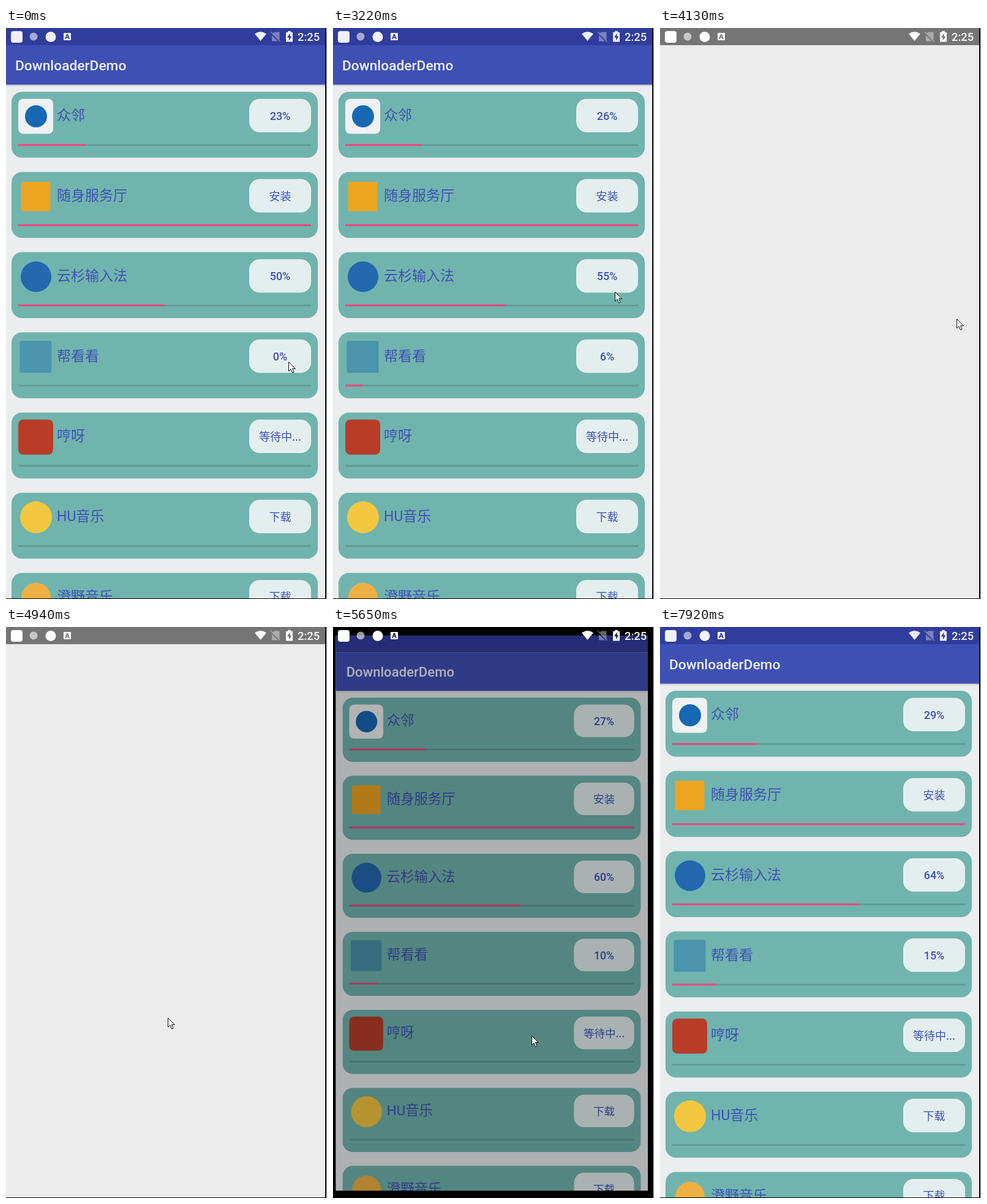
Animation of 524x931 px, one loop 8.2 s. Source, as an HTML page:

```html
<!DOCTYPE html>
<html lang="zh-CN">
<head>
<meta charset="utf-8">
<title>DownloaderDemo</title>
<style>
  html, body { margin: 0; width: 100%; height: 100%; overflow: hidden; background: #e6e6e6; }
  svg { display: block; width: 524px; height: 931px; }
  text { font-family: Roboto, "Noto Sans CJK SC", "Noto Sans CJK", sans-serif; }
  .title { font-size: 22.75px; font-weight: 500; fill: #eef0fa; }
  .name { font-size: 23px; fill: #3f51b5; }
  .action { font-size: 18px; font-weight: 500; fill: #3f51b5; text-anchor: middle; }
  .clock { font-size: 18.3px; font-weight: 500; }
</style>
</head>
<body>
<svg viewBox="0 0 524 931">
  <defs>
    <clipPath id="window"><rect x="-2.7" width="523.7" height="930"/></clipPath>
    <linearGradient id="shadow" x2="0" y2="1">
      <stop stop-color="#c2c5ca"/>
      <stop offset="1" stop-color="#ebedee"/>
    </linearGradient>
  </defs>
  <rect width="523" height="931" fill="#000"/>

  <g id="app" clip-path="url(#window)">
    <rect x="-3" width="524" height="930" fill="#ebedee"/>
    <rect x="-3" y="92" width="524" height="4" fill="url(#shadow)"/>
    <rect x="-3" width="524" height="28" fill="#303d9d"/>
    <rect x="-3" y="28" width="524" height="64.4" fill="#3f50b4"/>
    <text class="title" x="15" y="69">DownloaderDemo</text>
    <g id="rows"></g>
    <rect id="dim" x="-3" width="524" height="930"/>
  </g>

  <g id="installer">
    <rect width="521" height="930" fill="#ececec"/>
    <rect width="521" height="28" fill="#757575"/>
  </g>

  <g id="status" fill="#fff">
    <rect x="8" y="5" width="19" height="19" rx="4"/>
    <circle cx="45" cy="14" r="6.5" opacity=".6"/>
    <circle cx="73" cy="14.5" r="8.5"/>
    <path fill-rule="evenodd" d="M95 8h10q1 0 1 1v10q0 1-1 1h-10q-1 0-1-1v-10q0-1 1-1zM99 10l-3 8h1.9l.6-1.7h3l.6 1.7h1.9l-3-8zM100 12l.9 2.8h-1.8z"/>
    <path d="M406 9.5Q415.5 2.5 425 9.5L415.5 21Z"/>
    <g opacity=".38">
      <path d="M438 6.5h8.5v13.5L434 9.5ZM434 12l10 9.5h-10z"/>
      <path d="M432 6L447.5 22" stroke="#fff" stroke-width="1.5"/>
    </g>
    <path fill-rule="evenodd" d="M460 5h5v2h3v15.5h-11V7h3zM463.5 8.500l-4.500 7h3v5l4.300-7h-2.800z"/>
    <text class="clock" x="476" y="21">2:25</text>
  </g>

  <path id="cursor" d="M.5.5V15.500L4 12.300L6.500 18.300L9 17.200L6.500 11.500H11.300Z" fill="#fff" stroke="#111"/>
</svg>

<script>
const LOOP = 8200;
const CURSOR_TICK = 128;
const ROW_PITCH = 130.75;
const BAR_WIDTH = 478;
const $ = id => document.getElementById(id);
const clamp = v => Math.min(1, Math.max(0, v));

const square = (size, color, rx = 3) =>
  `<rect x="${48.5 - size / 2}" y="${40 - size / 2}" width="${size}" height="${size}" rx="${rx}" fill="${color}"/>`;
const circle = (r, color) => `<circle cx="49" cy="40" r="${r}" fill="${color}"/>`;

// A running download starts at `from` percent, gains one at `first` ms and another every `period` ms.
const apps = [
  { name: '众邻', download: { from: 23, first: 510, period: 1342 }, icon: square(57, '#eff1f3', 8) + circle(18, '#1768b2') },
  { name: '随身服务厅', action: '安装', percent: 100, icon: square(48, '#eda421') },
  { name: '云杉输入法', download: { from: 50, first: 530, period: 557 }, icon: circle(25, '#2468b0') },
  { name: '帮看看', download: { from: 0, first: 505, period: 527 }, icon: square(52, '#4c93ae') },
  { name: '哼呀', action: '等待中...', icon: square(57, '#b83c28', 8) },
  { name: 'HU音乐', action: '下载', icon: circle(26, '#f4c740') },
  { name: '澄野音乐', action: '下载', icon: circle(24, '#efb043') }
];

$('rows').innerHTML = apps.map((app, i) => `
  <g transform="translate(0 ${104 + i * ROW_PITCH})">
    <rect x="9" width="500" height="107.5" rx="17" fill="#70b4ad"/>
    ${app.icon}
    <text class="name" x="83" y="46.3">${app.name}</text>
    <rect x="397" y="11.5" width="101" height="54.5" rx="17" fill="#e5eeee"/>
    <text class="action" x="447.5" y="45.8" id="label${i}">${app.action || ''}</text>
    <rect x="20" y="85.5" width="${BAR_WIDTH}" height="2.7" fill="#609b95"/>
    <rect x="20" y="85.2" width="${BAR_WIDTH * (app.percent || 0) / 100}" height="3.1" fill="#ee4981" id="bar${i}"/>
  </g>`).join('');

// Cursor waypoints: time, x, y
const waypoints = [[3000, 461, 544], [3470, 459, 276], [3850, 459, 276], [4096, 484, 474], [4600, 264, 637],
  [5550, 264, 637], [5888, 511, 755], [6560, 444, 886], [6700, 444, 886], [6900, 446, 940]];

function cursorAt(t) {
  const next = waypoints.findIndex(p => p[0] > t);
  if (next <= 0) return waypoints.at(next);
  const [a, b] = [waypoints[next - 1], waypoints[next]];
  const k = (t - a[0]) / (b[0] - a[0]);
  return a.map((v, i) => v + (b[i] - v) * k);
}

// The activity moves back and returns in two visible steps of 120 ms.
const twoSteps = (t, start) => clamp(Math.floor((t - start) / 120) / 2);
const depthAt = t => twoSteps(t, 3740) - twoSteps(t, 5530);

function drawDownload({ from, first, period }, i, t) {
  const percent = from + Math.max(0, Math.floor((t - first) / period) + 1);
  $('label' + i).textContent = percent + '%';
  $('bar' + i).setAttribute('width', BAR_WIDTH * percent / 100);
}

function draw() {
  const t = performance.now() % LOOP;
  apps.forEach((app, i) => app.download && drawDownload(app.download, i, t));

  const depth = depthAt(t);
  const x = 14.1 * depth, y = 25.6 * depth ** .86;
  $('app').setAttribute('transform', `translate(${x} ${y}) scale(${1 - .054 * depth})`);
  $('dim').setAttribute('opacity', .395 * depth ** .6);
  $('status').setAttribute('opacity', depth ? 1 : .93);
  $('installer').style.display = t >= 4130 && t < 5530 ? '' : 'none';

  const [, cx, cy] = cursorAt(Math.floor(t / CURSOR_TICK) * CURSOR_TICK);
  $('cursor').setAttribute('transform', `translate(${Math.round(cx)} ${Math.round(cy)})`);
  requestAnimationFrame(draw);
}
draw();
</script>
</body>
</html>
```
